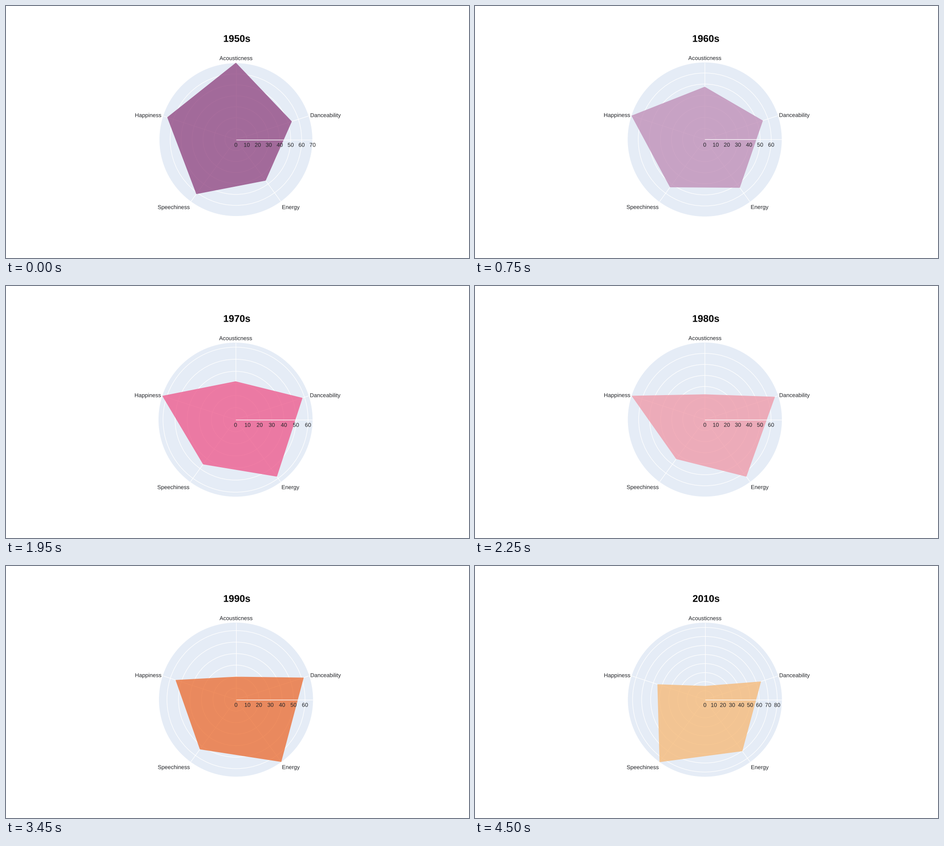
Recreate the animation shown at these times as a matplotlib script. Size 1014 px wide and 552 px high, loop 5.25 s.

```python
import numpy as np
import matplotlib.pyplot as plt
from matplotlib.animation import FuncAnimation
from matplotlib.patches import Circle, PathPatch, Polygon
from matplotlib.textpath import TextPath
from matplotlib.transforms import Affine2D

W, H, DPI = 1014, 552, 100
PX = 72 / DPI
PAPER, INK = "#E5ECF6", "#222428"
FILL_ALPHA = 0.78
ANGLES = np.radians([90, 18, -54, -126, 162])

# title, centre x, centre y, disc radius, pixels per ten units, visible fill,
# then the pixel radius of each corner in the order of ANGLES
DECADES = [
    ("1950s", 503.5, 292.7, 168.0, 24.00, (163, 106, 155),
     (168.5, 128.8, 111.0, 147.5, 158.2)),
    ("1960s", 503.1, 292.4, 168.7, 24.27, (199, 162, 197),
     (115.5, 134.0, 130.7, 129.4, 168.7)),
    ("1970s", 502.7, 292.8, 168.7, 26.47, (235, 121, 163),
     (84.0, 154.3, 154.2, 121.0, 168.7)),
    ("1980s", 503.4, 292.6, 168.7, 24.17, (237, 171, 185),
     (55.3, 161.5, 154.6, 106.8, 168.7)),
    ("1990s", 503.7, 292.7, 168.7, 25.20, (234, 138, 94),
     (50.2, 156.0, 168.7, 134.6, 139.2)),
    ("2000s", 503.6, 292.7, 168.0, 24.00, (238, 179, 167),
     (168.5, 128.8, 111.0, 147.5, 158.2)),
    ("2010s", 503.5, 292.9, 168.7, 19.80, (242, 196, 147),
     (30.2, 129.3, 139.4, 169.0, 109.4)),
]

# name, offset from the centre to the anchor and baseline, anchored side
LABELS = [
    ("Acousticness", 0, -174.2, 0.5),
    ("Danceability", 163.7, -49.3, 0),
    ("Energy", 101.6, 152.1, 0),
    ("Speechiness", -101.4, 152.1, 1),
    ("Happiness", -163.6, -49.3, 1),
]

fig = plt.figure(figsize=(W / DPI, H / DPI), dpi=DPI, facecolor="white")
ax = fig.add_axes([0, 0, 1, 1])


def text(string, x, y, size=12.3, side=0.5, weight="normal", color=INK):
    """Draw text with its ink anchored at x and its baseline at y."""
    font = {"family": "Liberation Sans", "weight": weight}
    path = TextPath((0, 0), string, size=size, prop=font)
    box = path.get_extents()
    x -= box.x0 + side * box.width
    flip = Affine2D().scale(1, -1).translate(x, y)
    ax.add_patch(PathPatch(flip.transform_path(path), fc=color, lw=0))


def rays(cx, cy, radii):
    return np.column_stack([cx + radii * np.cos(ANGLES),
                            cy - radii * np.sin(ANGLES)])


def white_line(x, y):
    ax.plot(x, y, color="white", lw=1.2 * PX, solid_capstyle="butt")


def see_through(shown):
    """Colour that looks like `shown` when laid over the disc."""
    paper = np.array([int(PAPER[i:i + 2], 16) for i in (1, 3, 5)])
    color = (np.array(shown) - (1 - FILL_ALPHA) * paper) / FILL_ALPHA
    return tuple(np.clip(color / 255, 0, 1)) + (FILL_ALPHA,)


def draw(index):
    title, cx, cy, radius, step, shown, corners = DECADES[index]
    ax.clear()
    ax.set(xlim=(0, W), ylim=(H, 0))
    ax.axis("off")

    ax.add_patch(Circle((cx, cy), radius, fc=PAPER, lw=0, zorder=0))
    rings = int(radius / step + 0.01)
    for k in range(1, rings + 1):
        ax.add_patch(Circle((cx, cy), k * step, fill=False, ec="white",
                            lw=1.2 * PX, zorder=1))
    for x, y in rays(cx, cy, radius):
        white_line([cx, x], [cy, y])

    ax.add_patch(Polygon(rays(cx, cy, np.array(corners)),
                         fc=see_through(shown), lw=0, zorder=3))
    ax.plot([cx, cx + radius], [cy, cy], color="white", lw=1.3 * PX,
            solid_capstyle="butt", zorder=4)

    for k in range(rings + 1):
        text(str(10 * k if k else 0), cx + k * step, cy + 15.7)
    for name, dx, dy, side in LABELS:
        text(name, cx + dx, cy + dy, side=side)
    text(title, 477.2, 78.6, size=21.4, side=0, weight="bold", color="black")
    for patch in ax.patches[-(rings + 1 + len(LABELS) + 1):]:
        patch.set_zorder(5)
    return []


anim = FuncAnimation(fig, draw, frames=len(DECADES), interval=750,
                     repeat=True, repeat_delay=0)
plt.show()
```
